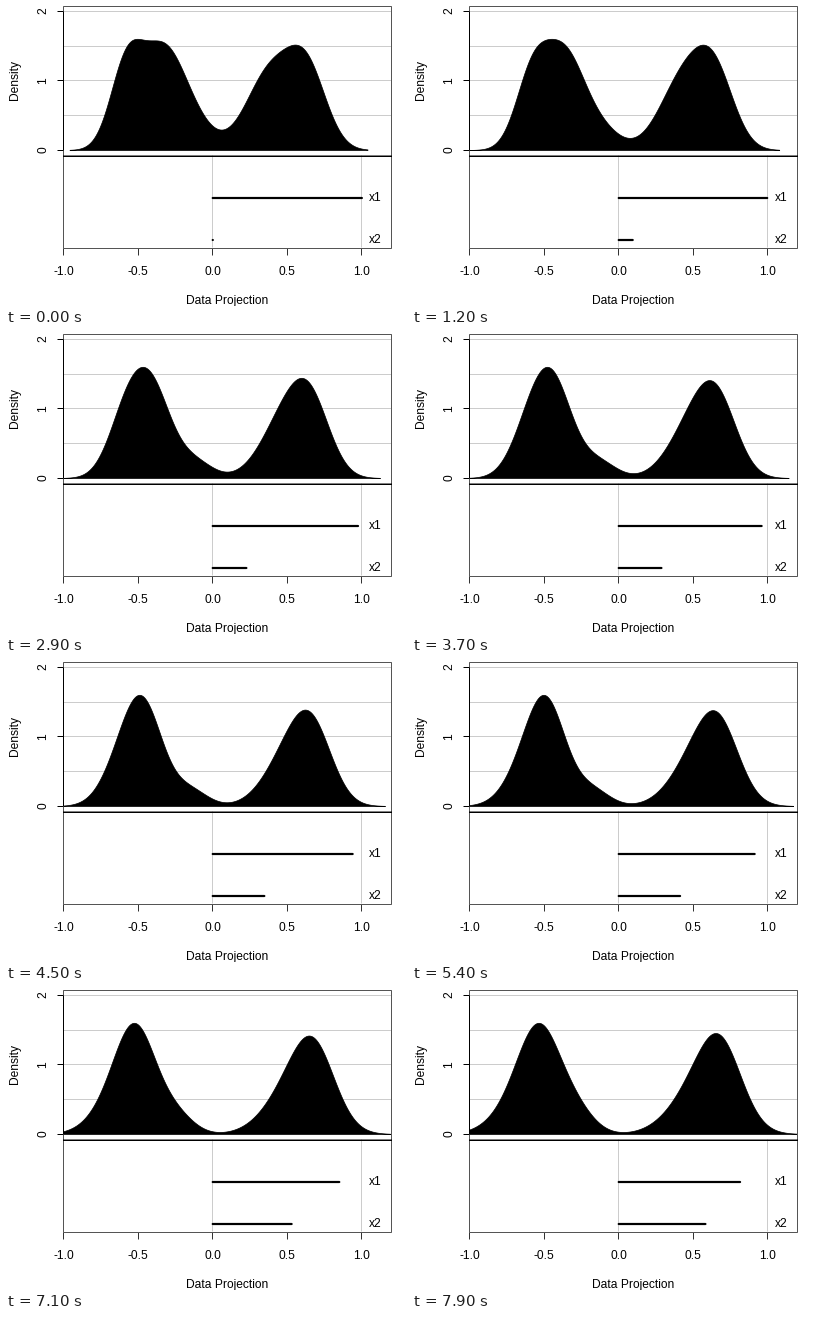
Recreate the animation shown at these times as a matplotlib script. Size 400 px wide and 300 px high, loop 8 s.

```python
import numpy as np
import matplotlib.pyplot as plt
from matplotlib.animation import FuncAnimation
from matplotlib.patches import Polygon, Rectangle

plt.rcParams["font.family"] = "Liberation Sans"

W, H, DPI = 400, 300, 100
PX = 72 / DPI
FRAMES, INTERVAL = 80, 100
TURN = np.pi / 400              # rotation of the projection per step

LEFT, RIGHT, TOP, SPLIT, BOTTOM = 57, 385, 0, 150, 242
X0, X_UNIT = 206.7, 149.2
Y0, Y_UNIT = 144.5, 69.5
PEAK = 1.6
BARS = {"x1": 192, "x2": 234}

# Five bumps as (mean, sd, height) at three moments of the rotation.
KNOTS = np.array([0, 29, 79])
BUMPS = np.array([
    [(-.58, .108, 1.1), (-.33, .15, 1.42), (-.10, .13, .22),
     (.635, .13, 1.06), (.385, .16, 1.1)],
    [(-.585, .12, .80), (-.408, .13, 1.27), (-.12, .12, .24),
     (.665, .13, .80), (.50, .165, .93)],
    [(-.58, .19, .70), (-.525, .135, .90), (-.28, .12, .24),
     (.69, .138, .79), (.57, .195, .76)],
])
RIGHT_END = np.array([362, 374.5, 385.5])


def sx(x):
    return X0 + X_UNIT * x


def sy(y):
    return Y0 - Y_UNIT * y


def blend(step, values):
    """Quadratic through the three knots."""
    total = 0
    for i, k in enumerate(KNOTS):
        others = np.delete(KNOTS, i)
        total = total + values[i] * np.prod((step - others) / (k - others))
    return total


def density(x, step):
    y = sum(h * np.exp(-((x - m) / s) ** 2 / 2)
            for m, s, h in blend(step, BUMPS))
    return y * PEAK / y.max()


fig = plt.figure(figsize=(W / DPI, H / DPI), dpi=DPI, facecolor="white")
ax = fig.add_axes([0, 0, 1, 1])
ax.set_xlim(0, W)
ax.set_ylim(H, 0)
ax.axis("off")


def line(xs, ys, color="black", z=2):
    """Hairline on whole pixels."""
    xs, ys = np.floor(np.subtract(xs, 0.1) + 0.2), np.floor(np.subtract(ys, 0.1))
    ax.plot(xs, ys, color=color, lw=PX, zorder=z, solid_capstyle="butt")


def label(x, y, text, ha="center", rotation=0):
    ax.text(x, y, text, size=12 * PX, ha=ha, va="baseline",
            rotation=rotation, rotation_mode="anchor")


def box(top, bottom):
    return ax.add_patch(Rectangle((LEFT, top), RIGHT - LEFT, bottom - top,
                                  fill=False, ec="#555555", lw=PX, zorder=4))


for y in (0.5, 1, 1.5, 2):
    line([LEFT, RIGHT], [sy(y)] * 2, "#cccccc", z=1)
for x in (0, 1):
    line([sx(x)] * 2, [SPLIT, BOTTOM], "#cccccc", z=1)

frame = box(TOP, SPLIT)
box(SPLIT, BOTTOM)
ax.plot([LEFT, RIGHT + 1], [SPLIT + 0.25] * 2, color="black", lw=1.5 * PX,
        zorder=5, solid_capstyle="butt", snap=False)

line([LEFT + 0.5] * 2, [sy(2), sy(0)], z=5)
for y in (0, 1, 2):
    line([LEFT - 6, LEFT + 0.5], [sy(y)] * 2)
    label(40.5, sy(y) - 0.7, str(y), rotation=90)
for x in (-1, -0.5, 0, 0.5, 1):
    line([sx(x)] * 2, [BOTTOM + 0.5, BOTTOM + 7.5], "#333333")
    label(sx(x), 269, f"{x:.1f}")
label(221.5, 298, "Data Projection")
label(12, 74, "Density", rotation=90)

bars = []
for name, y in BARS.items():
    bars += ax.plot([X0, X0], [y, y], color="black", lw=2.2 * PX, zorder=6,
                    solid_capstyle="round", snap=False)
    label(363, y + 3, name, ha="left")

hill = ax.add_patch(Polygon([(0, 0), (1, 1), (2, 0)], fc="black", ec="black",
                            lw=0.7 * PX, zorder=3))
hill.set_clip_path(frame)


def draw(step):
    start, end = 64 - 0.75 * step, blend(step, RIGHT_END)
    px = np.linspace(start, end, 400)
    py = sy(density((px - X0) / X_UNIT, step))
    hill.set_xy(np.vstack([(start, Y0), np.column_stack([px, py]), (end, Y0)]))
    angle = TURN * step
    for bar, size in zip(bars, (np.cos(angle), np.sin(angle))):
        bar.set_xdata([X0, sx(max(size, 0.001))])
    return [hill, *bars]


anim = FuncAnimation(fig, draw, frames=FRAMES, interval=INTERVAL,
                     repeat=True, repeat_delay=0)
plt.show()
```
